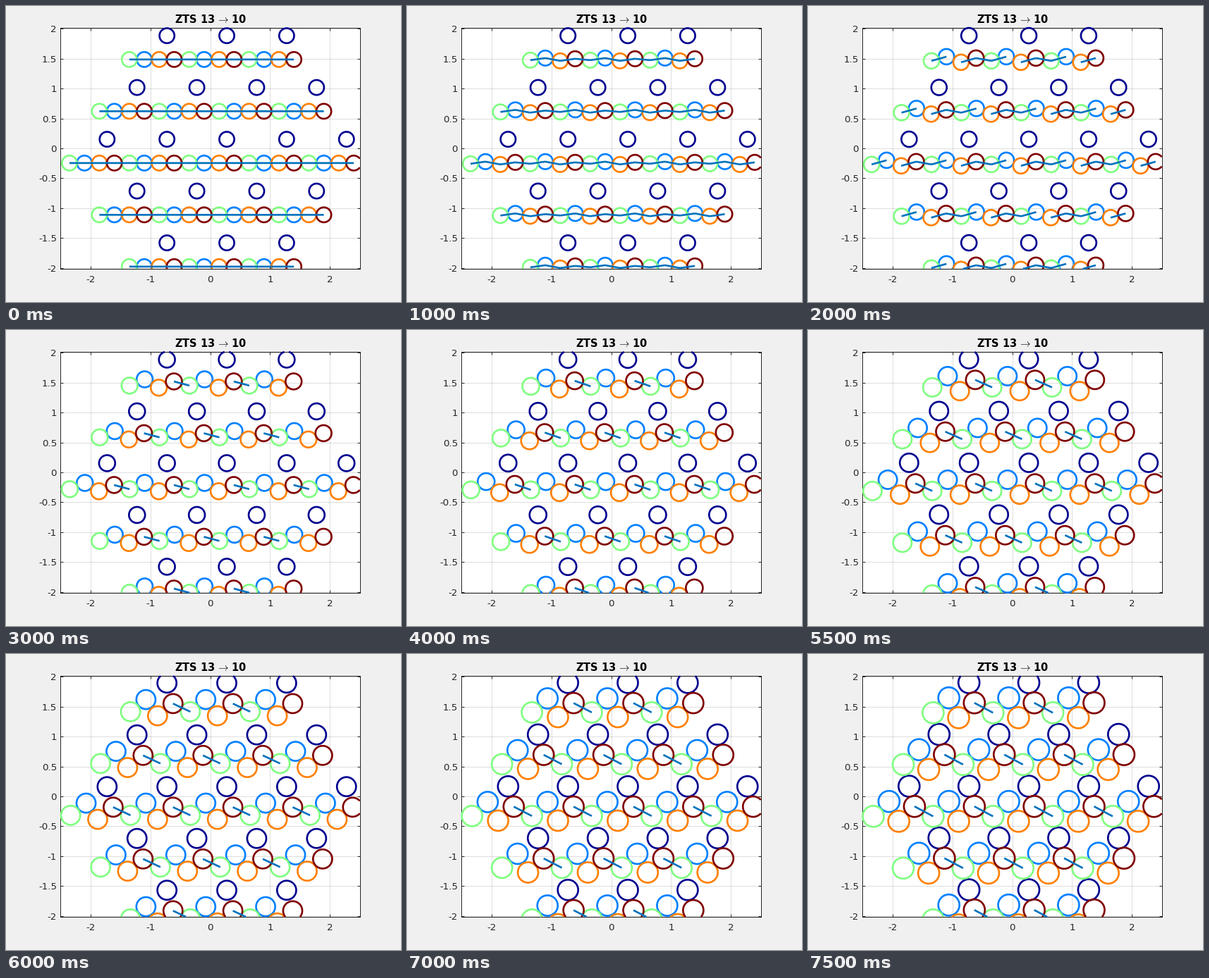
Animation of 560x420 px, one loop 8 s. Source, as a matplotlib script:

```python
import numpy as np
import matplotlib.pyplot as plt
from matplotlib.animation import FuncAnimation

W, H, DPI = 560, 420, 100
PX = 72 / DPI            # one pixel in points
FRAMES, INTERVAL = 16, 500
SCALE = 84.85            # pixels per data unit
XMAX, YMAX = 2.5, 171 / SCALE

plt.rcParams.update({"font.family": "DejaVu Sans", "mathtext.fontset": "cm"})

INK = (0.15, 0.15, 0.15)
BOND = (0, 0.447, 0.741)
TOLERANCE = 1.0083       # discs closer than this many diameters are bonded

ROWS = [[np.array((abs(j) / 2 - 2 + i, j * np.sqrt(3) / 2))
         for i in range(5 - abs(j))] for j in range(-2, 3)]
ANGLE = np.linspace(0, 2 * np.pi, 400)
RING = np.column_stack([np.cos(ANGLE), np.sin(ANGLE)])
ALONG = np.linspace(0, 1, 60)[:, None]
GAP = np.full((1, 2), np.nan)


def jet(level):
    """Jet colour of a level from 0 to 4."""
    level = max(level, 1 / 16)
    return tuple(np.clip(1.5 - abs(level - peak), 0, 1) for peak in (3, 2, 1))


def centres(step):
    """Chain of four, point symmetric about its middle, and one loose disc."""
    u = step / (FRAMES - 1)
    sway, rise = u ** 2, 1.06 * u - 0.06 * u ** 3
    lift = np.array((0, 0.018 * u ** 2.5))
    middle = np.array((0.023, -0.2455)) - 0.3 * lift
    outer = np.array((-0.375 + 0.031 * sway, -0.083 * rise))
    inner = np.array((-0.125 + 0.0435 * sway, 0.166 * rise))
    chain = middle + np.array([outer, inner, -inner, -outer])
    return chain, np.array((0.277, 0.152)) + lift


def joined(curves):
    """Chain curves into one broken line, cut at the axes limits."""
    pts = np.vstack([part for c in curves for part in (c, GAP)])
    outside = (np.abs(pts[:, 0]) > XMAX) | (np.abs(pts[:, 1]) > YMAX)
    pts[outside] = np.nan
    return pts.T


fig = plt.figure(figsize=(W / DPI, H / DPI), dpi=DPI, facecolor="#f0f0f0")
ax = fig.add_axes([77.4 / W, 47 / H, 2 * XMAX * SCALE / W, 342 / H])
ax.set(xlim=(-XMAX, XMAX), ylim=(-YMAX, YMAX))
xticks, yticks = np.arange(-2, 3), np.arange(-2, 2.1, 0.5)
ax.set_xticks(xticks, [f"{v:g}" for v in xticks])
ax.set_yticks(yticks, [f"{v:g}" for v in yticks])
ax.set_axisbelow(True)
ax.grid(color=INK, alpha=0.15, lw=PX)
ax.tick_params(direction="in", top=True, right=True, length=4.25 * PX,
               width=PX, color=INK, labelcolor=INK, labelsize=13.33 * PX)
ax.tick_params(axis="x", pad=8.5 * PX)
ax.tick_params(axis="y", pad=5.5 * PX)
for spine in ax.spines.values():
    spine.set(color=INK, linewidth=PX)
fig.text(289.8 / W, 1 - 24.3 / H, r"ZTS 13$\,\rightarrow\,$10", ha="center",
         va="baseline", weight="bold", size=14.67 * PX)


def stroke(color, zorder):
    return ax.plot([], [], color=color, lw=2.67 * PX, zorder=zorder,
                   clip_on=False, solid_capstyle="butt")[0]


discs = [stroke(jet(level), 3 + level) for level in (2, 1, 3, 4, 0)]
bonds = stroke(BOND, 9)


def draw(step):
    chain, loose = centres(step)
    rows = [np.vstack([chain + cell for cell in row]) for row in ROWS]
    gaps = [np.hypot(*np.diff(row, axis=0).T) for row in rows]
    diameter = np.concatenate(gaps).min()

    for line, p in zip(discs, [*chain, loose]):
        line.set_data(*joined([p + cell + diameter / 2 * RING
                               for row in ROWS for cell in row]))

    bonds.set_data(*joined([p + (q - p) * ALONG
                            for row, gap in zip(rows, gaps)
                            for p, q, d in zip(row, row[1:], gap)
                            if d < TOLERANCE * diameter]))
    return [*discs, bonds]


anim = FuncAnimation(fig, draw, frames=FRAMES, interval=INTERVAL,
                     repeat=True, repeat_delay=0)
plt.show()
```
